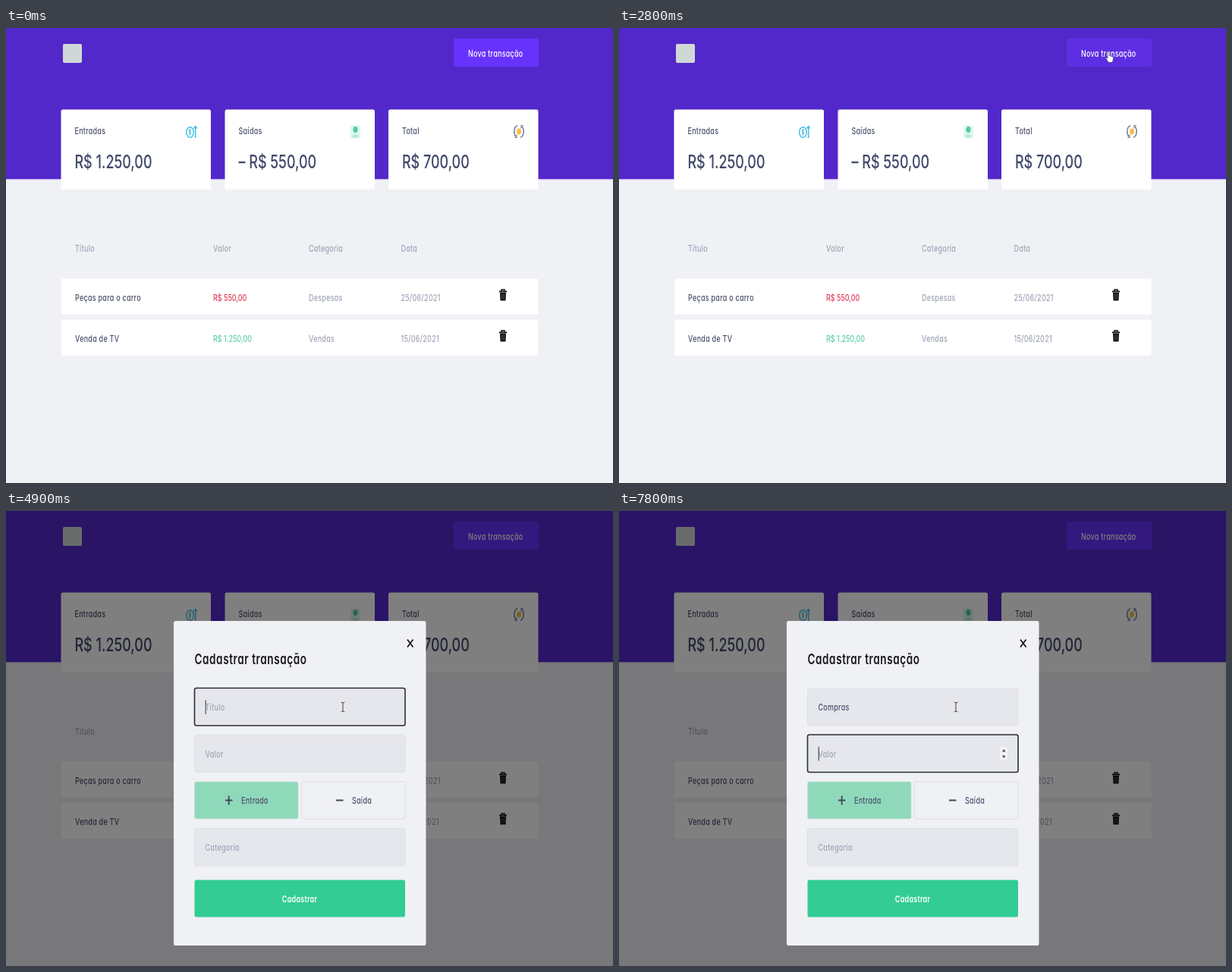
Animation of 800x600 px, one loop 8000 ms. Source, as an HTML page:

```html
<!DOCTYPE html>
<html lang="pt-BR">
<head>
<meta charset="utf-8">
<title>Transações</title>
<style>
  html, body { margin: 0; width: 100%; height: 100%; overflow: hidden; background: #f0f1f5; }
  svg { display: block; width: 100vw; height: 100vh; }
  text {
    font-family: Inter, Roboto, sans-serif;
    font-feature-settings: "cv11";
    font-size: 12.3px;
    font-weight: 500;
    letter-spacing: .03em;
    fill: #4b516b;
    white-space: pre;
  }
  .soft { filter: blur(.45px); }
  .muted { fill: #a0a4b7; }
  .money { letter-spacing: 0; }
  .big { font-size: 24.6px; letter-spacing: 0; fill: #40486a; }
  .red { fill: #e0405c; }
  .green { fill: #5fcfa4; }
  .heading { font-size: 18.5px; font-weight: 600; letter-spacing: .045em; fill: #16161c; }
  .white { fill: #fff; }
  .bold { font-weight: 600; }
</style>
</head>
<body>
<svg id="stage" viewBox="0 0 800 600" preserveAspectRatio="none"></svg>
<script>
const LOOP = 8000;
const STEP = 100;
const SQUEEZE = 0.73; // the whole page is shown narrower than it is tall
const stage = document.getElementById('stage');

const label = (x, y, str, cls = '', extra = '') =>
  `<text class="${cls}" transform="translate(${x} ${y}) scale(${SQUEEZE} 1)" ${extra}>${str}</text>`;
const box = (x, y, w, h, fill, extra = '') =>
  `<rect x="${x}" y="${y}" width="${w}" height="${h}" rx="2.5" fill="${fill}" ${extra}/>`;

const card = (x, name, value) =>
  box(x, 107.5, 197.5, 105.5, '#fff') + label(x + 18, 140, name) + label(x + 18, 185, value, 'big');

const trash = (x, y) => `<g transform="translate(${x} ${y})">
  <path d="M3 3V1h4v2" fill="none" stroke="#111" stroke-width="1.4"/>
  <path d="M0 2.4h10v2H0zM1 5h8l-.5 10.5h-7z" fill="#111"/>
  <path d="M3.4 6.5v7M5 6.5v7M6.6 6.5v7" stroke="#777" stroke-width=".5"/></g>`;

const row = (y, title, value, color, category, date) =>
  box(73, y, 628.5, 47.5, '#fff') + label(91, y + 29, title) +
  label(273, y + 29, value, 'money ' + color) + label(399, y + 29, category, 'muted') +
  label(520.5, y + 29, date, 'muted') + trash(650, y + 13.5);

const incomeIcon = `<g fill="none" stroke="#4bbfe0" stroke-width="1.5">
  <ellipse cx="242.5" cy="137.5" rx="4.8" ry="6.8"/>
  <path d="M244 134.5q-3-1.5-3 1.2t2.5 2.3-2.8 2.4M242.5 133v9" stroke-width="1"/>
  <path d="M249.7 145v-15M247.6 132.5l2.1-3 2.1 3"/></g>`;
const outcomeIcon = `<rect x="454" y="128" width="13" height="18" rx="4" fill="#e0f7ee"/>
  <ellipse cx="460.5" cy="134" rx="3" ry="4" fill="#4dcaa3"/>
  <path d="M456 142.5q4.500-5 9 0l-2 2h-5z" fill="#b5ead7"/>`;
const totalIcon = `<g fill="none" stroke="#7a8798" stroke-width="1.6">
  <path d="M674 128.5q-4.2 2-4.2 8 0 4.5 2.6 7M678 144.5q4.200-2 4.200-8 0-4.500-2.600-7"/>
  <path d="M670 144.5h3v-4M682 128.5h-3v4" stroke-width="1.2"/></g>
  <ellipse cx="676" cy="136.5" rx="3" ry="4" fill="#f6bd46"/>`;

const field = (id, y, name) =>
  box(248.5, y, 277.5, 49.5, '#e6e7ec', `id="${id}Box"`) +
  label(262.5, y + 29.5, name, 'muted', `id="${id}Text"`);

// Backgrounds overhang the stage so the softening does not fade its edges
const page = `<g class="soft">
  <rect x="-10" y="-10" width="820" height="620" fill="#f0f1f5"/>
  <rect x="-10" y="-10" width="820" height="209.5" fill="#5328ca"/>
  <rect x="-10" y="199.5" width="820" height="1.5" fill="#e6dff7"/>
  <rect x="75" y="21" width="25" height="25" rx="2" fill="#cfd8d6"/>
  ${box(590, 14, 112, 37, '#6733fc', 'id="newButton"')}
  ${label(609, 38, 'Nova transação', 'white')}
  ${card(72.5, 'Entradas', 'R$ 1.250,00')}${incomeIcon}
  ${card(288.5, 'Saídas', '– R$ 550,00')}${outcomeIcon}
  ${card(504, 'Total', 'R$ 700,00')}${totalIcon}
  ${[[91, 'Título'], [273, 'Valor'], [399, 'Categoria'], [520.5, 'Data']]
    .map(([x, name]) => label(x, 294.5, name, 'muted')).join('')}
  ${row(330.5, 'Peças para o carro', 'R$ 550,00', 'red', 'Despesas', '25/06/2021')}
  ${row(384.5, 'Venda de TV', 'R$ 1.250,00', 'green', 'Vendas', '15/06/2021')}</g>`;

const modal = `<g id="modal" class="soft">
  <rect x="-10" y="-10" width="820" height="620" fill="#000" opacity=".5"/>
  ${box(221, 145, 332.5, 428, '#f0f1f5')}
  <path d="M529 169.5l7.5 10M536.5 169.5l-7.5 10" stroke="#111" stroke-width="1.7"/>
  ${label(248.5, 202, 'Cadastrar transação', 'heading')}
  ${field('title', 233.5, 'Título')}
  ${field('value', 295, 'Valor')}
  ${box(248.5, 357, 136.5, 49, '#8fd9bb', 'stroke="#c9dfd8" stroke-width=".8"')}
  ${box(389.5, 357, 136.5, 49, '#f0f1f5', 'stroke="#dcdde3"')}
  <path d="M289 381.5h9.5M293.7 375.5v12M435 381.5h9.5" stroke="#40465c" stroke-width="1.8"/>
  ${label(310, 386, 'Entrada')}
  ${label(456, 386, 'Saída')}
  ${field('category', 418.5, 'Categoria')}
  ${box(248.5, 486.5, 277.5, 49, '#33cc95')}
  ${label(387, 515.5, 'Cadastrar', 'white bold', 'text-anchor="middle"')}
  <g id="spinner"><rect x="502" y="311" width="10" height="18" fill="#f2f2f4"/>
    <path d="M505 317.5l2.2-3.5 2.2 3.5zM505 322.5l2.2 3.5 2.2-3.5z" fill="#444"/></g>
  <rect id="caret" width="1" height="18.5" fill="#333"/>
</g>`;

const cursors = `
  <path id="arrow" d="M0 0v12.5l2.2-2.5 1.6 4.3 1.5-.9-1.6-4.1h2.9z"
    fill="#fff" stroke="#444" stroke-width=".9" stroke-linejoin="round"/>
  <path id="hand" d="M-1 1q1-1.5 2 0v5l4.5 1.5q1.3.5 1 2.5l-1 5h-5.5l-3.2-5q-.4-2 1.2-1.3l1 1z"
    fill="#fff" stroke="#3b3466" stroke-width=".7"/>
  <path id="beam" d="M-2.3-6.3q2.3 0 2.3 1.5 0-1.5 2.3-1.5M0-5V5M-2.3 6.3q2.3 0 2.3-1.5 0 1.5 2.3 1.5"
    fill="none" stroke="#444" stroke-width="1"/>`;

stage.innerHTML = page + modal + cursors;
const el = id => document.getElementById(id);
const show = (node, on) => node.setAttribute('visibility', on ? 'visible' : 'hidden');

// Pointer stops: time, x, y
const path = [
  [1000, 715, 398], [1600, 715, 408], [1800, 690, 318], [2000, 669, 247],
  [2300, 655, 120], [2500, 648, 45], [2600, 645, 31], [2900, 645, 30],
  [3300, 470, 226], [3500, 460, 240], [3700, 444, 258.5]
];
const keys = [[6000, 'C'], [6200, 'o'], [6400, 'm'], [7100, 'p'], [7200, 'r'], [7400, 'a'], [7500, 's']];
const caretSpans = [[3900, 4400], [4900, 5500], [6000, 6900], [7100, LOOP]];
const OPEN = 2900, FOCUS = 3800, TAB = 7800;

function pointerAt(t) {
  const next = path.findIndex(p => p[0] > t);
  if (next < 0) return path.at(-1).slice(1);
  if (next === 0) return path[0].slice(1);
  const [a, b] = [path[next - 1], path[next]];
  const k = (t - a[0]) / (b[0] - a[0]);
  return [a[1] + (b[1] - a[1]) * k, a[2] + (b[2] - a[2]) * k];
}

function setFocus(id, on) {
  const rect = el(id + 'Box');
  rect.setAttribute('stroke', on ? '#2c2c36' : '#dedfe5');
  rect.setAttribute('stroke-width', on ? 1.6 : 0.8);
}

function drawPointer(t) {
  const [x, y] = pointerAt(t);
  const kind = t < 1000 ? '' : t >= 3500 ? 'beam' : t >= 2500 && t < OPEN ? 'hand' : 'arrow';
  for (const id of ['arrow', 'hand', 'beam']) {
    show(el(id), id === kind);
    el(id).setAttribute('transform', `translate(${x} ${y})`);
  }
}

function draw(t) {
  const typed = keys.filter(k => k[0] <= t).map(k => k[1]).join('');
  const inValue = t >= TAB;
  const title = el('titleText');

  el('newButton').setAttribute('fill', t >= 2500 && t < 3000 ? '#5e2ee3' : '#6733fc');
  show(el('modal'), t >= OPEN);

  title.textContent = typed || 'Título';
  title.setAttribute('class', typed ? '' : 'muted');
  setFocus('title', t >= FOCUS && !inValue);
  setFocus('value', inValue);
  setFocus('category', false);
  show(el('spinner'), t >= OPEN && inValue);

  const typedWidth = typed && !inValue ? title.getComputedTextLength() * SQUEEZE : 0;
  el('caret').setAttribute('x', 262.7 + typedWidth);
  el('caret').setAttribute('y', inValue ? 311 : 249.5);
  show(el('caret'), caretSpans.some(([from, to]) => t >= from && t < to));

  drawPointer(t);
}

const start = performance.now();
function tick() {
  const t = (performance.now() - start) % LOOP;
  draw(Math.floor(t / STEP) * STEP);
  requestAnimationFrame(tick);
}
tick();
</script>
</body>
</html>
```
